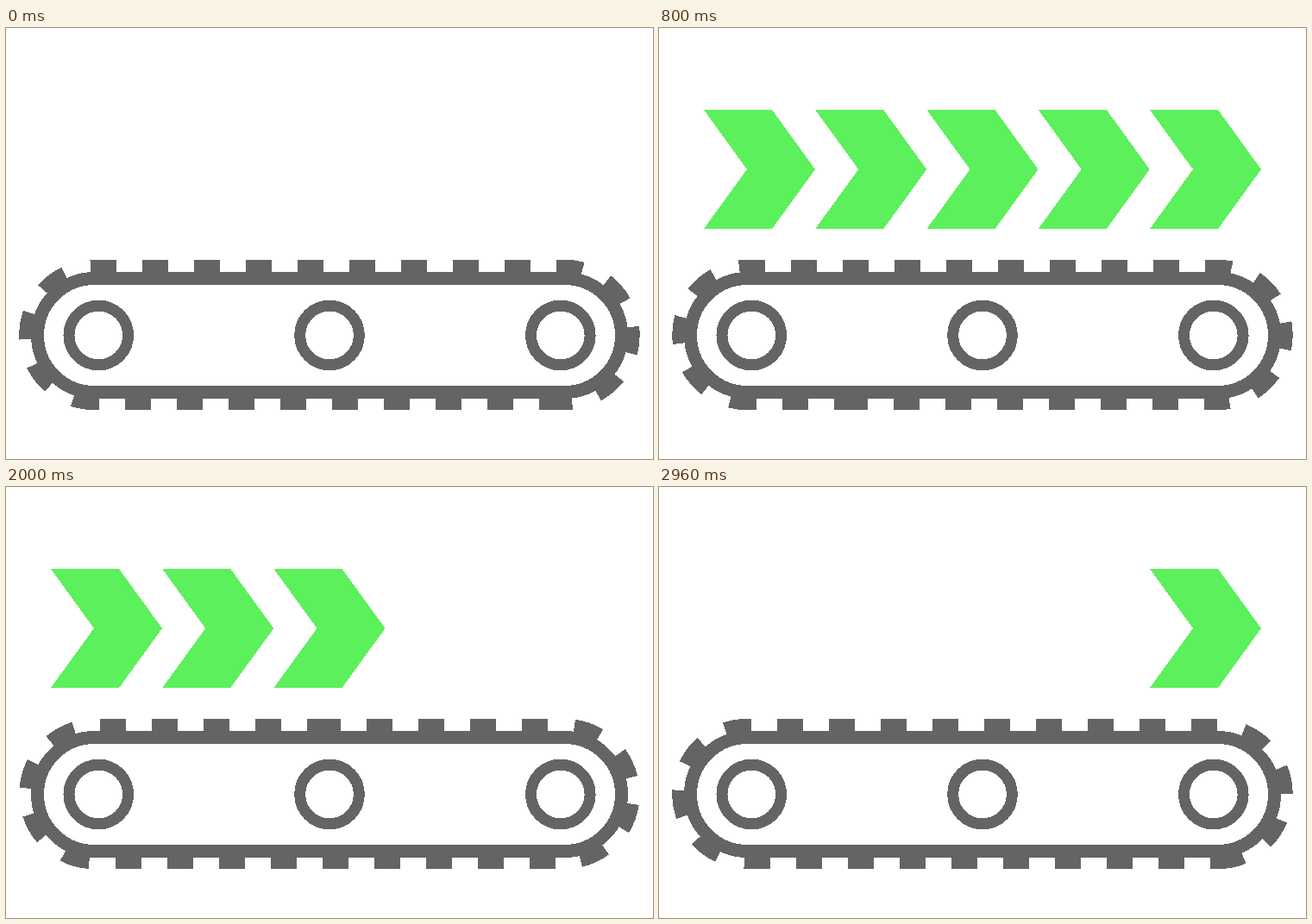
Write an HTML page that moves like this. It is 750 px wide and 500 px high and loops after 3 s.

```html
<!DOCTYPE html>
<html lang="en">
<head>
<meta charset="utf-8">
<title>Conveyor belt</title>
<style>
  html, body { margin: 0; width: 100%; height: 100%; overflow: hidden; background: #fff; }
  svg { display: block; width: 750px; height: 500px; shape-rendering: crispEdges; }
  .belt { fill: none; stroke: #646464; }
  .arrows { fill: #5cf05c; }
</style>
</head>
<body>
<svg viewBox="0 0 750 500">
  <g class="arrows"></g>
  <g class="belt">
    <path id="treads" stroke-width="22" d="M647.5 432.25H102.5A76.25 76.25 0 0 1 102.5 279.75H647.5A76.25 76.25 0 0 1 647.5 432.25"/>
    <rect x="36.5" y="290.5" width="677" height="132" rx="66" stroke-width="15"/>
    <g stroke-width="13">
      <circle cx="107.3" cy="356.5" r="34.3"/>
      <circle cx="375" cy="356.5" r="34.3"/>
      <circle cx="642.8" cy="356.5" r="34.3"/>
    </g>
  </g>
</svg>
<script>
const LOOP = 3000, HALF = LOOP / 2, STEP = 40, ARROWS = 5, STATES = 11;
const LAP = 1090 + 2 * Math.PI * 76.25;
const treads = document.getElementById('treads');
const group = document.querySelector('.arrows');

// 26 treads fill one lap; the first takes up the remainder
treads.setAttribute('stroke-dasharray', `${LAP - 1530} 30` + ' 30 30'.repeat(25));

const arrows = Array.from({ length: ARROWS }, (_, i) => {
  const arrow = document.createElementNS('http://www.w3.org/2000/svg', 'path');
  arrow.setAttribute('d', 'M52 95h79l50 69l-50 69h-79l50 -69z');
  arrow.setAttribute('transform', `translate(${i * 129.25})`);
  return group.appendChild(arrow);
});

const clamp = x => Math.max(0, Math.min(1, x));

function draw(t) {
  const phase = t % HALF;
  // the belt hesitates after each bend and catches up along the straight
  const lag = 5.6 * clamp(Math.min((phase - 8) / 40, (1057 - phase) / 450));
  const shift = t / LOOP * LAP - lag - 9.5;
  treads.setAttribute('stroke-dashoffset', LAP - shift);

  const state = Math.floor(phase / HALF * STATES);
  arrows.forEach((arrow, i) => {
    const on = state > i && state < STATES - ARROWS + 1 + i;
    arrow.setAttribute('visibility', on ? 'visible' : 'hidden');
  });
}

const start = performance.now();
function tick() {
  const t = (performance.now() - start) % LOOP;
  draw(Math.floor(t / STEP) * STEP);
  requestAnimationFrame(tick);
}
tick();
</script>
</body>
</html>
```
